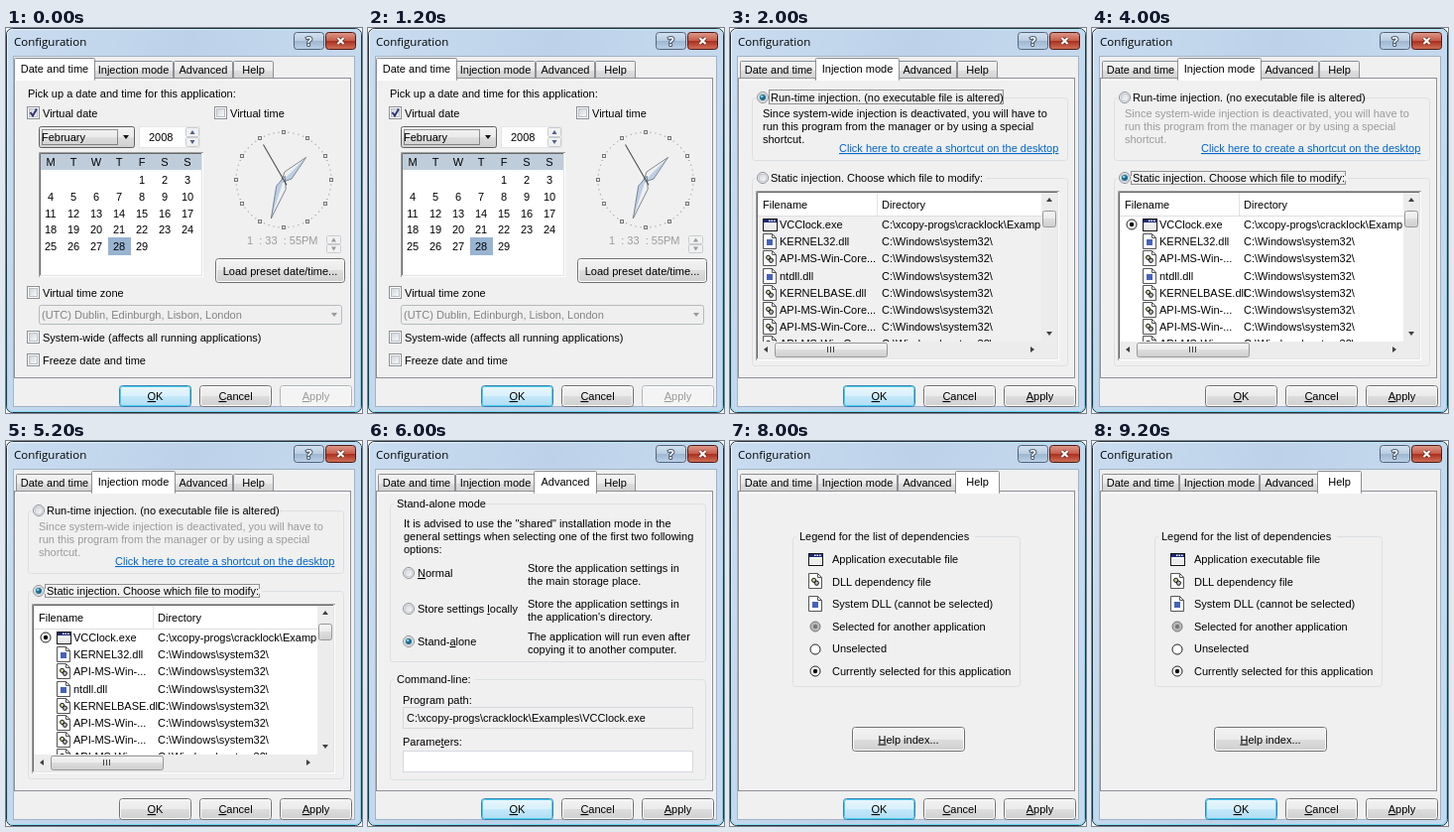
An HTML page for the animation above (10 s loop, 359x388 px).

```html
<!DOCTYPE html>
<html lang="en">
<head>
<meta charset="utf-8">
<title>Configuration</title>
<style>
html, body { margin: 0; width: 100%; height: 100%; overflow: hidden; background: #fff; }
svg { display: block; }
text { font: 11px "Liberation Sans", Arial, sans-serif; white-space: pre; }
.title { font: 11.5px "Open Sans", "Noto Sans", sans-serif; }
.help { font: bold 13px "Open Sans", "Noto Sans", sans-serif; paint-order: stroke; stroke: #4a5a6e; stroke-width: 2px; }
.u { text-decoration: underline; }
</style>
</head>
<body>
<svg id="stage" width="359" height="388" xmlns="http://www.w3.org/2000/svg"></svg>
<script>
const GREY = '#f0f0f0', DIM = '#9a9a9a', EDGE = '#8c8e94', LINE = '#dcdfe2', FIELD = '#d4d8de';

// Basic shapes; "&" in a label underlines the next letter.
const rect = (x, y, w, h, fill, more = '') =>
  `<rect x="${x}" y="${y}" width="${w}" height="${h}" fill="${fill}" ${more}/>`;
const box = (x, y, w, h, fill, stroke, rx = 0, more = '') =>
  rect(x + .5, y + .5, w - 1, h - 1, fill, `stroke="${stroke}" rx="${rx}" ${more}`);
const path = (d, fill, stroke = 'none', more = '') =>
  `<path d="${d}" fill="${fill}" stroke="${stroke}" ${more}/>`;
const dot = (x, y, r, fill, stroke = 'none') =>
  `<circle cx="${x}" cy="${y}" r="${r}" fill="${fill}" stroke="${stroke}"/>`;
const text = (x, y, s, fill = '#000', more = '') =>
  `<text x="${x}" y="${y}" fill="${fill}" ${more}>${s.replace(/&(.)/, '<tspan class="u">$1</tspan>')}</text>`;
const mid = (x, y, s, fill, more = '') => text(x, y, s, fill, `text-anchor="middle" ${more}`);
const lines = (x, y, list, fill) => list.map((s, i) => text(x, y + 13 * i, s, fill)).join('');
const gradient = (id, stops, dir = 'x2="0" y2="1"') =>
  `<linearGradient id="${id}" ${dir}>${stops.map(([o, c]) => `<stop offset="${o}" stop-color="${c}"/>`).join('')}</linearGradient>`;

// Controls
const arrow = (x, y, dx, dy, fill = '#404040', r = 3) =>
  path(dx ? `M${x - dx * 2} ${y - r}v${2 * r}l${dx * 4} ${-r}z` : `M${x - r} ${y - dy * 2}h${2 * r}l${-r} ${dy * 4}z`, fill);
const focus = (x, y, w, h) => box(x, y, w, h, 'none', '#333', 0, 'stroke-dasharray="1 1"');
const sunken = (x, y, w, h) => rect(x, y, w, h, '#fff') +
  path(`M${x + .5} ${y + h}V${y + .5}H${x + w}`, 'none', '#a0a0a0') +
  path(`M${x + 1.5} ${y + h - 1}V${y + 1.5}H${x + w - 1}`, 'none', '#696969') +
  path(`M${x + w - 1.5} ${y + 1}V${y + h - 1.5}H${x + 1}`, 'none', '#e3e3e3');
const button = (x, y, w, h, label, state) =>
  box(x, y, w, h, { off: '#f4f4f4', main: 'url(#main)' }[state] || 'url(#btn)',
    { off: '#adb2b5', main: '#3c7fb1' }[state] || '#707070', 3) +
  box(x + 1, y + 1, w - 2, h - 2, 'none', state == 'main' ? '#46d0f2' : '#fcfcfc', 2) +
  mid(x + w / 2, y + h / 2 + 4, label, state == 'off' ? DIM : '#000');
const check = (x, y, label, on) =>
  box(x, y, 13, 13, '#fff', EDGE) + box(x + 2, y + 2, 9, 9, 'url(#well)', '#b8bec6') +
  (on ? path(`M${x + 3.5} ${y + 6}l2.5 3.5l4-7`, 'none', '#31347c', 'stroke-width="2"') : '') +
  text(x + 16, y + 11, label);
const radio = (x, y, on) =>
  dot(x, y, 5.5, '#fafafa', EDGE) + dot(x, y, 4, 'url(#well)', '#c3c8ce') +
  (on ? dot(x, y, 3, '#1c6a8c') + dot(x - .8, y - 1, 1.3, '#7fd3ea') : '');
const oldRadio = (x, y, on, fill = '#fff') =>
  dot(x, y, 5, fill, fill == '#fff' ? '#222' : '#777') + (on ? dot(x, y, 2.2, fill == '#fff' ? '#000' : '#777') : '');
const spinner = (x, y, w, h, colour) => [0, 1].map(i =>
  box(x, y + i * h / 2, w, h / 2, '#f1f1f1', '#c8ccd0', 1) +
  arrow(x + w / 2, y + h / 4 + i * h / 2, 0, i ? 1 : -1, colour, 2.5)).join('');
const group = (x, y, w, h, gap, label = '') =>
  box(x, y, w, h, 'none', LINE, 3) + rect(x + 4, y - 2, gap, 5, GREY) + text(x + 7, y + 4, label);

// File icons, 16 px wide around (x, y)
const exeIcon = (x, y) => box(x - 7, y - 6, 15, 13, '#fff', '#111') +
  rect(x - 6, y - 5, 13, 3, '#1b2a7a') + [0, 2.5, 5].map(d => rect(x + d - 1, y - 4.5, 1.5, 1.5, '#fff')).join('') +
  rect(x - 5, y, 11, 5, '#ececec');
const page = (x, y) => path(`M${x - 6.5} ${y - 7.5}h9l4 4v11h-13z`, '#fff', '#555') +
  path(`M${x + 2.5} ${y - 7.5}v4h4`, 'none', '#555');
const dllIcon = (x, y) => page(x, y) +
  `<g transform="rotate(45 ${x} ${y})">${box(x - 4, y - 2, 5, 5, '#d8d8a0', '#222', 2)}${box(x, y - 2, 5, 5, '#bbb', '#222', 2)}</g>`;
const sysIcon = (x, y) => page(x, y) + rect(x - 3, y - 2, 6, 6, '#4762b8');

function frame() {
  const cross = 'M334.5 10l6 6m0-6l-6 6';
  return box(0, 0, 359, 388, 'url(#glass)', '#2b333d', 6) + box(1, 1, 357, 386, 'none', 'url(#rim)', 5) +
    box(7, 28, 345, 354, GREY, '#9fb3c8') +
    text(8, 18, 'Configuration', '#000', 'class="title"') +
    box(290, 4, 31, 18, 'url(#cap)', '#52657a', 3) + mid(305.5, 18, '?', '#fff', 'class="help"') +
    box(322, 4, 31, 18, 'url(#close)', '#4c1a16', 3) +
    path(cross, 'none', '#5c2018', 'stroke-width="3.6"') + path(cross, 'none', '#fff', 'stroke-width="2.2"');
}

function tabs(active) {
  const names = ['Date and time', 'Injection mode', 'Advanced', 'Help'], edges = [10, 88, 169, 229, 270];
  const tab = i => {
    const on = i == active, x = edges[i], w = edges[i + 1] - x;
    return (on ? box(x - 2, 30, w + 4, 24, '#fff', EDGE, 1) : box(x, 33, w, 19, 'url(#tab)', EDGE, 1)) +
      mid(x + w / 2, on ? 45 : 46, names[i]);
  };
  const x = edges[active] - 1, w = edges[active + 1] - x + 1;
  return names.map((_, i) => i == active ? '' : tab(i)).join('') + box(8, 50, 340, 303, '#fff', EDGE) +
    tab(active) + rect(x, 50, w, 5, '#fff') + rect(10, 53, 336, 298, GREY);
}

const footer = (ok, apply) => button(114, 360, 73, 22, '&OK', ok) +
  button(195, 360, 73, 22, '&Cancel') + button(276, 360, 73, 22, '&Apply', apply);

function calendar() {
  const col = c => 45 + c * 23;
  let s = sunken(33, 125, 166, 126) + rect(35, 127, 162, 16, '#bfcddb') + rect(103, 211, 23, 18, '#99b4d1');
  [...'MTWTFSS'].forEach((d, c) => s += mid(col(c), 139, d));
  for (let d = 1; d <= 29; d++) s += mid(col((d + 3) % 7), 157 + Math.floor((d + 3) / 7) * 16.8, `${d}`);
  return s;
}

function clock(x, y) {
  const at = `translate(${x} ${y})`;
  let s = '';
  for (let i = 0; i < 60; i++) {
    const a = i * Math.PI / 30, px = x + 48 * Math.sin(a), py = y - 48 * Math.cos(a);
    s += i % 5 ? rect(px - .5, py - .5, 1, 1, '#888')
      : rect(Math.round(px) - 1.5, Math.round(py) - 1.5, 3, 3, '#e8e8e8', 'stroke="#777"');
  }
  const hand = (angle, len, w) => `<g transform="${at} rotate(${angle})">` +
    path(`M0 4L${w} ${-len * .2}L0 ${-len}z`, '#bccfe6') +
    path(`M0 4L${w} ${-len * .2}L0 ${-len}L${-w} ${-len * .2}z`, 'none', '#5d6876', 'stroke-width=".7"') + '</g>';
  return s + hand(45, 32, 5) + hand(198, 41, 5) +
    path('M0 6V-41', 'none', '#444', `transform="${at} rotate(330)"`);
}

function datePage() {
  return text(22, 70, 'Pick up a date and time for this application:') +
    check(21, 79, 'Virtual date', true) + check(210, 79, 'Virtual time') +
    box(33, 99, 97, 22, 'url(#btn)', '#606060', 2) + focus(36, 102, 77, 16) +
    text(36, 114, 'February') + arrow(121, 110, 0, 1, '#111') +
    box(134, 99, 62, 22, '#fff', '#e3e5e8') + text(144, 114, '2008') + spinner(181, 100, 14, 20, '#4a6184') +
    calendar() + clock(280, 153) +
    text(243, 218, '1  : 33  : 55PM', DIM) + spinner(323, 209, 15, 18, '#999') +
    button(211, 232, 131, 25, 'Load preset date/time...') +
    check(21, 260, 'Virtual time zone') +
    box(33, 279, 306, 20, '#efefef', '#b5b9bd', 2) +
    text(36, 293, '(UTC) Dublin, Edinburgh, Lisbon, London', '#838383') + arrow(331, 289, 0, 1, '#999') +
    check(21, 305, 'System-wide (affects all running applications)') + check(21, 328, 'Freeze date and time');
}

function fileList(fixed) {
  const files = ['VCClock.exe', 'KERNEL32.dll', 'API-MS-Win-Core...', 'ntdll.dll', 'KERNELBASE.dll',
    ...Array(3).fill('API-MS-Win-Core...')];
  const shift = fixed ? 18 : 0;
  let rows = '';
  files.forEach((name, i) => {
    const y = 198 + i * 17.2, icon = !i ? exeIcon : i == 1 || i == 3 ? sysIcon : dllIcon;
    rows += icon(40 + shift, Math.round(y)) +
      text(50 + shift, y + 4, fixed ? name.replace('Core', '') : name) +
      text(153, y + 4, i ? 'C:\\Windows\\system32\\' : 'C:\\xcopy-progs\\cracklock\\Examples\\');
  });
  return sunken(26, 164, 306, 171) + rect(28, 190, 286, 126, fixed ? '#fff' : GREY) +
    `<g clip-path="url(#list)">${rows}</g>` + (fixed ? oldRadio(40, 198, true) : '') +
    rect(28, 189, 286, 1, LINE) + rect(148, 166, 1, 23, '#e0e3e8') +
    text(33, 182, 'Filename') + text(153, 182, 'Directory') +
    rect(314, 166, 16, 167, '#ececec') + rect(28, 316, 286, 17, '#ececec') +
    arrow(322, 173, 0, -1) + arrow(322, 308, 0, 1) + arrow(36, 324, -1, 0) + arrow(305, 324, 1, 0) +
    box(315, 184, 14, 17, 'url(#btn)', '#979797', 2) + box(45, 317, 114, 15, 'url(#btn)', '#979797', 2) +
    [98, 101, 104].map(x => rect(x, 321, 1, 6, '#444')).join('');
}

function injectionPage(fixed) {
  return group(22, 70, 319, 64, 249) + radio(33, 70, !fixed) +
    text(41, 74, 'Run-time injection. (no executable file is altered)') +
    (fixed ? focus(39, 144, 217, 14) : focus(39, 62, 237, 15)) +
    lines(33, 90, ['Since system-wide injection is deactivated, you will have to',
      'run this program from the manager or by using a special', 'shortcut.'], fixed ? DIM : '#000') +
    text(110, 125, 'Click here to create a shortcut on the desktop', '#0066cc', 'class="u"') +
    group(22, 151, 319, 190, 232) + radio(33, 151, fixed) +
    text(41, 155, 'Static injection. Choose which file to modify:') + fileList(fixed);
}

function advancedPage() {
  const modes = [
    [133, '&Normal', 'Store the application settings in', 'the main storage place.'],
    [169, 'Store settings &locally', 'Store the application settings in', "the application's directory."],
    [202, 'Stand-&alone', 'The application will run even after', 'copying it to another computer.']];
  return group(22, 63, 319, 160, 94, 'Stand-alone mode') +
    lines(36, 87, ['It is advised to use the "shared" installation mode in the',
      'general settings when selecting one of the first two following', 'options:']) +
    modes.map(([y, name, ...note], i) => radio(41, y, i == 2) + text(50, y + 4, name) + lines(161, y - 1, note)).join('') +
    group(22, 240, 319, 102, 82, 'Command-line:') +
    text(35, 265, 'Program path:') + box(35, 268, 293, 22, GREY, FIELD) +
    text(39, 283, 'C:\\xcopy-progs\\cracklock\\Examples\\VCClock.exe') +
    text(35, 307, 'Parame&ters:') + box(35, 312, 293, 22, '#fff', FIELD);
}

function helpPage() {
  return group(63, 96, 230, 152, 180, 'Legend for the list of dependencies') +
    exeIcon(86, 119) + dllIcon(86, 141) + sysIcon(86, 164) +
    oldRadio(86, 187, true, '#b8b8b8') + oldRadio(86, 210) + oldRadio(86, 232, true) +
    ['Application executable file', 'DLL dependency file', 'System DLL (cannot be selected)',
      'Selected for another application', 'Unselected', 'Currently selected for this application']
      .map((s, i) => text(103, 123 + i * 22.5, s)).join('') +
    button(123, 288, 114, 25, '&Help index...');
}

const defs = '<defs>' +
  gradient('btn', [[0, '#f3f3f3'], [.5, '#ebebeb'], [.5, '#dddddd'], [1, '#cfcfcf']]) +
  gradient('main', [[0, '#eaf6fd'], [.5, '#d9f0fc'], [.5, '#c4e8fa'], [1, '#b0dcf4']]) +
  gradient('tab', [[0, '#f3f3f3'], [.5, '#ebebeb'], [.5, '#dedede'], [1, '#d2d2d2']]) +
  gradient('cap', [[0, '#d5e2f0'], [.5, '#b9cce1'], [.5, '#9db5cf'], [1, '#bcd2e8']]) +
  gradient('close', [[0, '#dd9a8c'], [.5, '#c65a47'], [.5, '#a92c1c'], [1, '#d0735a']]) +
  gradient('glass', [[0, '#c9dcf0'], [.5, '#bdd2e9'], [1, '#c6d9ee']], 'x2="1" y2=".2"') +
  gradient('rim', [[0, '#f2f8fd'], [1, '#62dcf6']], 'x2=".6" y2="1"') +
  gradient('well', [[0, '#cfd4da'], [1, '#fafafa']], 'x2="1" y2="1"') +
  '<clipPath id="list"><rect x="28" y="190" width="286" height="126"/></clipPath></defs>';

const scenes = [
  tabs(0) + datePage() + footer('main', 'off'),
  tabs(1) + injectionPage(false) + footer('main'),
  tabs(1) + injectionPage(true) + footer(),
  tabs(2) + advancedPage() + footer('main'),
  tabs(3) + helpPage() + footer('main')
];
const stage = document.getElementById('stage');
stage.innerHTML = defs + frame() + scenes.map(s => `<g class="scene">${s}</g>`).join('');
const groups = stage.querySelectorAll('.scene');

const start = performance.now();
function draw() {
  const now = Math.floor(Math.max(0, performance.now() - start) % 10000 / 2000);
  groups.forEach((g, i) => g.style.display = i == now ? '' : 'none');
  requestAnimationFrame(draw);
}
draw();
</script>
</body>
</html>
```
